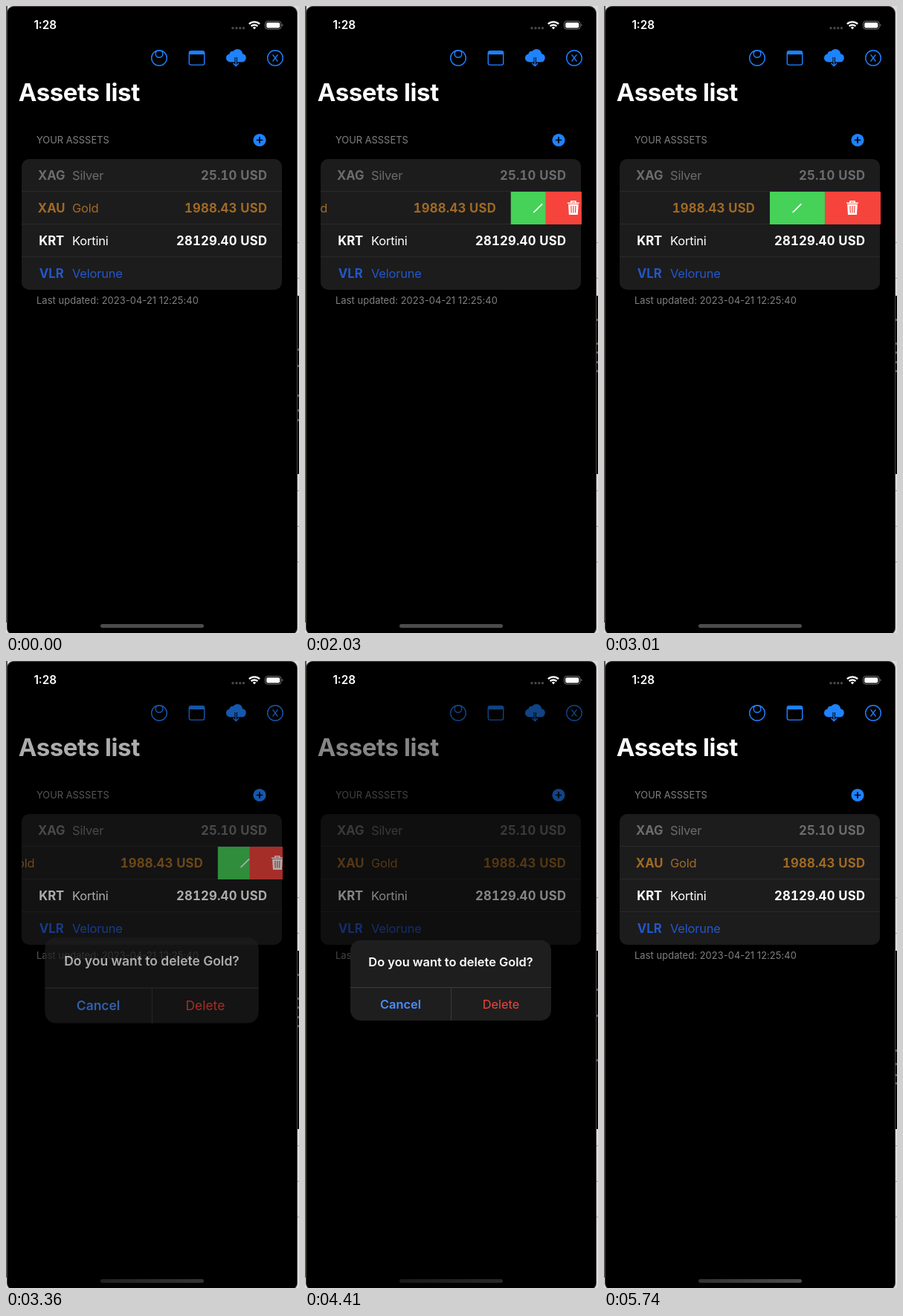
An HTML page that plays this animation: 394x844 px, repeating every 5810 ms.

```html
<!DOCTYPE html>
<html lang="en">
<head>
<meta charset="utf-8">
<title>Assets list</title>
<style>
html, body { margin: 0; width: 100%; height: 100%; overflow: hidden; background: #000; }
svg { display: block; width: 394px; height: 844px; }
text {
  font: 16.5px Inter, "Open Sans", sans-serif;
  font-optical-sizing: none;
  white-space: pre;
}
.mid { text-anchor: middle; }
.end { text-anchor: end; }
.row text { letter-spacing: -.2px; }
.row .bold { font-size: 16.7px; font-weight: 700; letter-spacing: 0; font-variant-numeric: tabular-nums; }
.row .end { letter-spacing: .22px; }
.note { font-size: 12.9px; fill: #808084; }
.icon { fill: none; stroke: #1f82ff; stroke-width: 1.4; }
.sep { stroke: #2a2a2b; stroke-width: 1; }
</style>
</head>
<body>
<svg viewBox="0 0 394 844" xmlns="http://www.w3.org/2000/svg">
  <defs>
    <clipPath id="rowClip"><rect x="21" y="250" width="351" height="44"/></clipPath>
    <clipPath id="editClip"><rect id="editBox" y="250" height="44"/></clipPath>
    <linearGradient id="faded">
      <stop stop-color="#323234"/><stop offset="1" stop-color="#4c4c4e"/>
    </linearGradient>
  </defs>

  <!-- desktop behind the phone -->
  <rect width="394" height="844" fill="#dcdcdf"/>
  <rect width="2" height="830" fill="#555"/>
  <rect x="391" y="390" width="3" height="240" fill="#000"/>
  <path d="M391 318.5h3M391 366.5h3M391 652.5h3M391 700.5h3M391 748.5h3" stroke="#9a9a9e"/>
  <g id="scraps" fill="#5c5c5e"></g>
  <rect x="1.5" y=".5" width="390" height="846" rx="9" fill="#000" stroke="#4a4340"/>

  <!-- toolbar -->
  <g class="icon">
    <circle cx="206" cy="70" r="10.3"/>
    <circle cx="206" cy="64.5" r="4.8"/>
    <rect x="246.3" y="60.8" width="20.4" height="18.6" rx="2.6"/>
    <path d="M246.5 63.2h20" stroke-width="4"/>
    <circle cx="362" cy="70" r="10.3"/>
    <path d="M358.6 65.4l6.8 9.2M365.4 65.4l-6.8 9.2"/>
  </g>
  <path d="M301.5 75.5a5.6 5.6 0 0 1-1-11.1 4.6 4.6 0 0 1 5-3.6 7 7 0 0 1 12.6 3.4 5.7 5.7 0 0 1-.8 11.3z" fill="#1f82ff"/>
  <path d="M309.2 69v8" stroke="#000" stroke-width="3.4"/>
  <path class="icon" d="M309.2 68.4v12M305.4 77l3.8 3.8 3.8-3.8"/>

  <text x="16.8" y="128" fill="#fff" style="font-size:33px;font-weight:700;letter-spacing:-.4px">Assets list</text>
  <text class="note" x="41" y="185">YOUR ASSSETS</text>
  <circle cx="341" cy="180.5" r="8.6" fill="#1f82ff"/>
  <path d="M336.8 180.5h8.4M341 176.3v8.4" stroke="#000" stroke-width="1.7"/>

  <!-- list -->
  <rect x="21" y="206" width="350" height="176" rx="10" fill="#1c1c1d"/>
  <path class="sep" d="M21 249.5h350M21 293.5h350M21 337.5h350"/>
  <g id="rows"></g>
  <g clip-path="url(#rowClip)">
    <g id="goldRow"></g>
    <rect id="edit" y="250" height="44" fill="#46d158"/>
    <g clip-path="url(#editClip)">
      <path id="pencil" d="M-6.5 6.5L-5.6 4.6 5.2-6.2 6.5-5 -4.4 5.8z" fill="#fff"/>
    </g>
    <rect id="del" y="250" height="44" fill="#f6443c"/>
    <g id="trash" fill="none" stroke="#fff" stroke-width="1.6">
      <path d="M-8-6.7H8M-3-7v-2.2h6V-7"/>
      <path d="M-6.2-4.6H6.2L5.4 8.4H-5.4z" fill="#fff" stroke-width="1.2"/>
      <path d="M-3-3l.3 9.5M0-3v9.5M3-3l-.3 9.5" stroke="#f6443c" stroke-width="1.2"/>
    </g>
  </g>
  <text class="note" x="41" y="400.5" style="letter-spacing:.07px">Last updated: 2023-04-21 12:25:40</text>

  <rect id="home" x="127" y="832" width="139" height="5" rx="2.5"/>
  <rect id="dim" x="2" y="1" width="389" height="843" rx="8"/>

  <!-- status bar -->
  <text x="37.4" y="31" fill="#fff" style="font-size:15.3px;font-weight:600">1:28</text>
  <g fill="#48484a">
    <circle cx="305" cy="29.7" r="1.7"/><circle cx="310" cy="29.7" r="1.7"/>
    <circle cx="314.8" cy="29.7" r="1.7"/><circle cx="319.5" cy="29.7" r="1.7"/>
  </g>
  <g fill="none" stroke="#fff" stroke-width="2.3">
    <path d="M326.9 24.2a10.3 10.3 0 0 1 14.2 0M329.6 27.2a6.5 6.5 0 0 1 8.8 0"/>
    <path d="M331.8 29a3.2 3.2 0 0 1 4.4 0L334 31.4z" fill="#fff" stroke="none"/>
  </g>
  <rect x="348.5" y="20.5" width="21.5" height="10.6" rx="3.3" fill="none" stroke="#77777a"/>
  <rect x="350.2" y="22.2" width="18.1" height="7.2" rx="1.9" fill="#fff"/>
  <path d="M371.4 24v3.6a2 2 0 0 0 0-3.6z" fill="#77777a"/>

  <!-- alert, centred on its own origin -->
  <g id="alert">
    <rect x="-135" y="-54.3" width="270" height="108.3" rx="14" fill="#1e1e1f"/>
    <path d="M-135 9.5H135M.5 9.5V54" stroke="#3b3b3d"/>
    <text class="mid" y="-18.8" fill="#fff" style="font-size:16.4px;font-weight:600">Do you want to delete Gold?</text>
    <text class="mid" x="-67.5" y="38" fill="#4a8cff" style="font-size:16.4px;font-weight:600">Cancel</text>
    <text class="mid" x="67.5" y="38" fill="#f0453a" style="font-size:16.4px">Delete</text>
  </g>
</svg>

<script>
const LOOP = 5810, STEP = 70;
const OPEN = 148, PULL = 169, RIGHT = 371;
const $ = id => document.getElementById(id);
const set = (id, attrs) => {
  for (const k in attrs) $(id).setAttribute(k, attrs[k]);
};

const assets = [
  ["XAG", "Silver", "25.10 USD", "#6c6c6e"],
  ["XAU", "Gold", "1988.43 USD", "#a06a24"],
  ["KRT", "Kortini", "28129.40 USD", "#ffffff"],
  ["VLR", "Velorune", "", "#2457c8"]
];
const rowText = ([code, name, price, color], i) => {
  const y = 234.3 + 44 * i;
  return `<g class="row" fill="${color}">
    <text class="bold mid" x="61.2" y="${y}">${code}</text>
    <text x="89" y="${y}">${name}</text>
    <text class="bold end" x="351.2" y="${y}">${price}</text></g>`;
};
assets.forEach((asset, i) => {
  $(i === 1 ? "goldRow" : "rows").innerHTML += rowText(asset, i);
});

// Bits of another window showing past the right edge: start time, then heights
const scraps = [
  [0, 463, 485, 525, 545, 558],
  [1400, 442, 468, 480, 535],
  [1820, 423, 455, 467, 480, 492],
  [4340, 443, 478, 538],
  [5600, 525, 543, 558, 569]
];

// Critically damped spring falling from 1 to 0
const spring = (ms, rate) => {
  const x = Math.max(0, ms) * rate / 1000;
  return (1 + x) * Math.exp(-x);
};
const smooth = x => {
  x = Math.min(1, Math.max(0, x));
  return x * x * (3 - 2 * x);
};

function swipe(t) {
  if (t <= 2240) return PULL * smooth((t - 1785) / 455);
  if (t < 3290) return OPEN + (PULL - OPEN) * spring(t - 2240, 10.8);
  return OPEN * spring(t - 3201, 8.98);
}

function draw(t) {
  const off = swipe(t), w = off / 2, mid = Math.max(w, 74) / 2;
  const left = RIGHT - off;
  const open = off > .5 ? 1 : 0;
  set("goldRow", { transform: `translate(${-off} 0)` });
  set("edit", { x: left, width: w });
  set("editBox", { x: left, width: w });
  set("del", { x: left + w, width: w + open });
  set("pencil", { transform: `translate(${left + mid - .5} 272)` });
  set("trash", { transform: `translate(${left + w + mid} 272)`, opacity: open });

  const shown = t < 4760 ? 1 - spring(t - 3220, 16.6) : spring(t - 4760, 16.6);
  const scale = t < 4760 ? 1.2 - .2 * shown : 1;
  set("dim", { opacity: .48 * shown });
  set("alert", { opacity: shown, transform: `translate(196 430) scale(${scale})` });
  set("home", { fill: t < 3290 ? "#4c4c4e" : "url(#faded)" });

  const [, ...ys] = scraps.filter(s => s[0] <= t).pop();
  $("scraps").innerHTML = ys.map(y => `<rect x="392" y="${y - 2}" width="2" height="3"/>`).join("");
}

const start = performance.now();
function tick() {
  const t = (performance.now() - start) % LOOP;
  draw(Math.floor(t / STEP) * STEP);
  requestAnimationFrame(tick);
}
tick();
</script>
</body>
</html>
```
